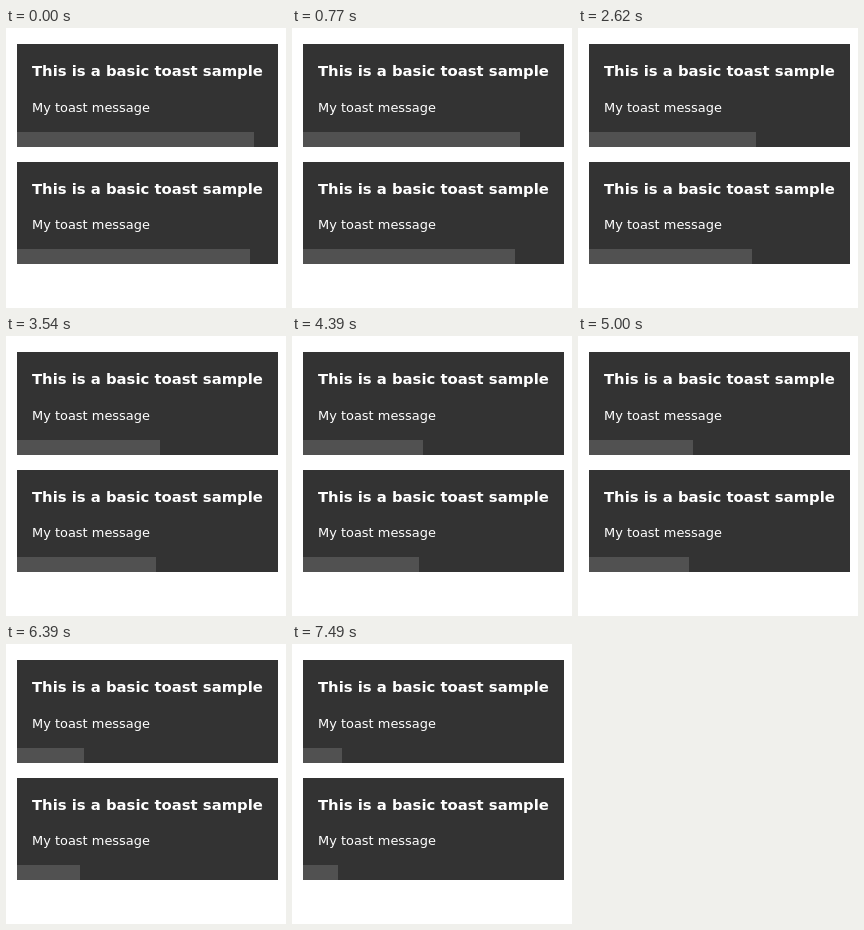
An HTML page for the animation above (7.54 s loop, 280x280 px).

```html
<!DOCTYPE html>
<html lang="en">
<head>
<meta charset="utf-8">
<title>Toast sample</title>
<style>
  html, body { margin: 0; width: 100%; height: 100%; overflow: hidden; background: #fff; }
  svg { display: block; }
  text { fill: #fff; font-family: Verdana, "DejaVu Sans", sans-serif; }
  .title { font-size: 14.84px; font-weight: bold; }
  .message { font-size: 12.95px; }
  .panel { fill: #333; }
  .bar { fill: #515151; }
</style>
</head>
<body>
<svg width="280" height="280" viewBox="0 0 280 280">
  <rect class="panel" x="11" y="16" width="261" height="103"/>
  <rect class="bar" x="11" y="104" height="15"/>
  <text class="title" x="26" y="48">This is a basic toast sample</text>
  <text class="message" x="26" y="84">My toast message</text>

  <rect class="panel" x="11" y="134" width="261" height="102"/>
  <rect class="bar" x="11" y="221" height="15"/>
  <text class="title" x="26" y="166">This is a basic toast sample</text>
  <text class="message" x="26" y="201">My toast message</text>
</svg>
<script>
  const LOOP = 7540, LEFT = 11, SPEED = 2.043;
  const [first, second] = document.querySelectorAll('.bar');

  // The bars shrink in discrete steps, slightly slower near the end.
  const stepAt = t => t < 7000
    ? Math.floor((t + 7) / 77)
    : Math.min(97, 91 + Math.floor((t - 7000) / 81));

  function setEdge(bar, start, end, step) {
    const edge = Math.max(end, Math.floor(start - SPEED * step));
    bar.setAttribute('width', edge - LEFT);
  }

  function draw(now) {
    const step = stepAt(now % LOOP);
    setEdge(first, 248.45, 50, step);
    setEdge(second, 244, 46, step);
  }

  const startTime = performance.now();
  function tick() {
    draw(performance.now() - startTime);
    requestAnimationFrame(tick);
  }
  tick();
</script>
</body>
</html>
```
